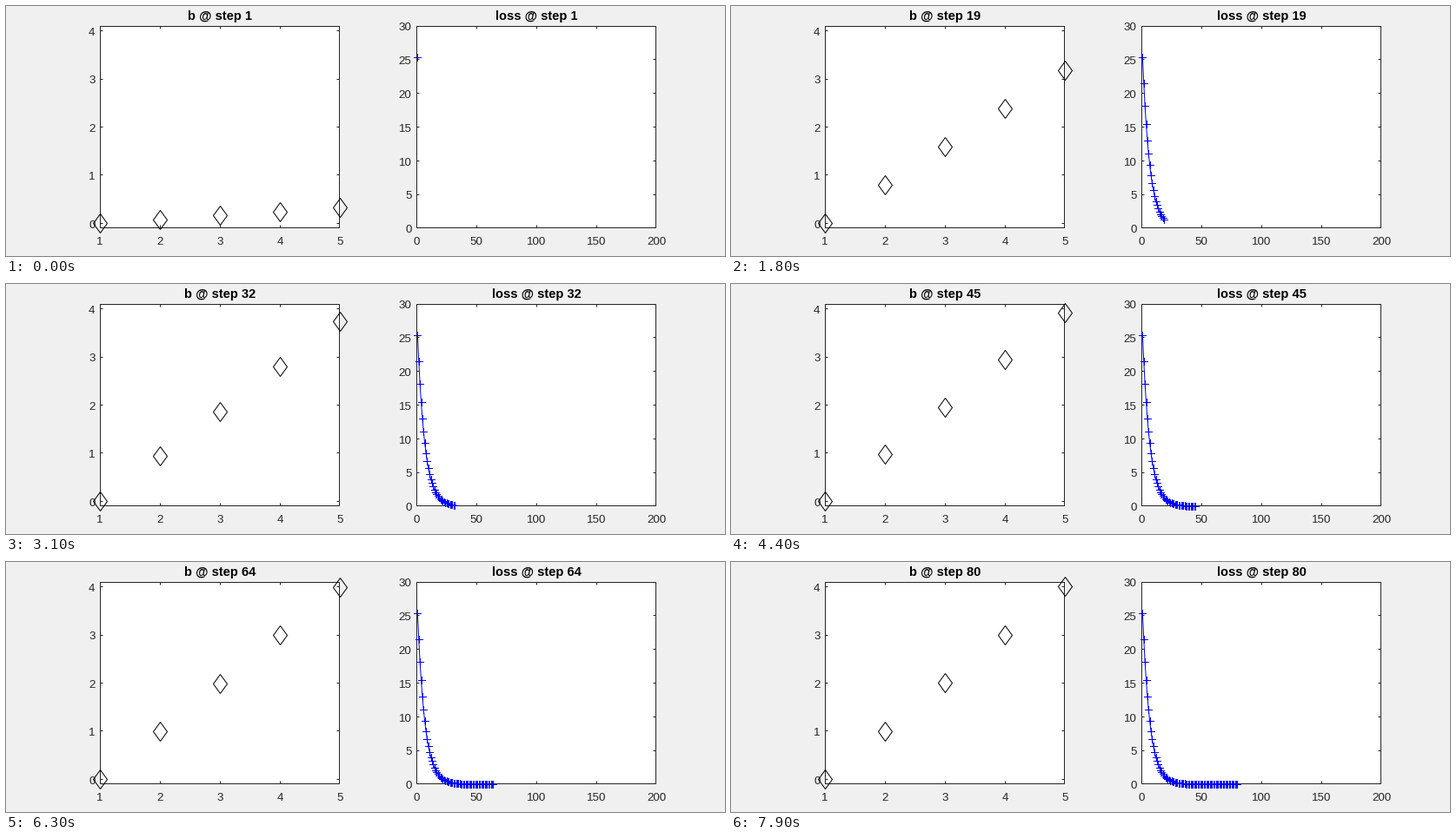
A matplotlib script for the animation above (8000 ms loop, 827 px wide and 288 px high).

```python
import numpy as np
import matplotlib.pyplot as plt
from matplotlib.animation import FuncAnimation
from matplotlib.collections import LineCollection, PolyCollection
from matplotlib.markers import MarkerStyle
from matplotlib.patches import Rectangle

W, H, DPI = 827, 288, 64
PX = 72 / DPI  # points per pixel
STEPS = 80
RATE = 0.08
INK = "#262626"
TOP, BOTTOM, WIDTH = 23, 256, 276

plt.rcParams["font.family"] = "Liberation Sans"
fig = plt.figure(figsize=(W / DPI, H / DPI), dpi=DPI, facecolor="#f0f0f0")
ax = fig.add_axes([0, 0, 1, 1])
ax.set_xlim(0, W)
ax.set_ylim(H, 0)
ax.axis("off")


def label(x, y, text, ha="center", size=13.33, color=INK, weight="normal"):
    return ax.text(x, y, text, ha=ha, va="baseline", fontsize=size * PX,
                   color=color, weight=weight)


class Panel:
    def __init__(self, left, xlim, ylim, xticks, yticks):
        self.left, self.xlim, self.ylim = left, xlim, ylim
        self.title = label(left + WIDTH / 2, 16, "", size=14.67,
                           color="black", weight="bold")
        self.draw_frame(xticks, yticks)

    def px(self, x):
        lo, hi = self.xlim
        return self.left + (np.asarray(x) - lo) / (hi - lo) * WIDTH

    def py(self, y):
        lo, hi = self.ylim
        return BOTTOM - (np.asarray(y) - lo) / (hi - lo) * (BOTTOM - TOP)

    def draw_frame(self, xticks, yticks):
        x0, x1 = self.left + 0.5, self.left + WIDTH - 0.5
        y0, y1 = TOP + 0.5, BOTTOM - 0.5
        ax.add_patch(Rectangle((self.left, TOP), WIDTH, BOTTOM - TOP,
                               fc="white", ec="none", zorder=0))
        lines = [[(x0, y0), (x1, y0), (x1, y1), (x0, y1), (x0, y0), (x1, y0)]]
        for t in xticks:
            x = self.px(t)
            label(x, 275, str(t))
            x = min(np.floor(x) + 0.5, x1)
            lines += [[(x, y0), (x, y0 + 3)], [(x, y1), (x, y1 - 3)]]
        for t in yticks:
            y = self.py(t)
            label(self.left - 5.5, y + 5.3, str(t), ha="right")
            y = min(np.floor(y) + 0.5, y1)
            lines += [[(x0, y), (x0 + 3, y)], [(x1, y), (x1 - 3, y)]]
        box = LineCollection(lines, colors=INK, linewidths=PX, zorder=1)
        box.set_snap(False)
        ax.add_collection(box)


weights = Panel(108, (1, 5), (-0.1, 4.1), range(1, 6), range(5))
losses = Panel(472, (0, 200), (0, 30), range(0, 201, 50), range(0, 31, 5))

goal = np.arange(5)
diamond = np.array([(-8, 0), (0, -11), (8, 0), (0, 11)])
diamonds = PolyCollection([diamond], facecolors="none", edgecolors="black",
                          linewidths=PX, joinstyle="miter", zorder=4)
diamonds.set_snap(False)
ax.add_collection(diamonds, autolim=False)

curve, = ax.plot([], [], color="blue", lw=PX, ms=8 * PX, mew=PX, zorder=4,
                 marker=MarkerStyle("+", capstyle="projecting"))


def update(frame):
    step = frame + 1
    weights.title.set_text(f"b @ step {step}")
    losses.title.set_text(f"loss @ step {step}")

    # Gradient descent shrinks the error by a fixed factor each step.
    b = goal * (1 - (1 - RATE) ** step)
    centers = np.column_stack([weights.px(goal + 1), weights.py(b)])
    diamonds.set_verts([diamond + np.floor(c) + 0.5 for c in centers])

    n = np.arange(1, step + 1)
    loss = np.sum(goal ** 2) * (1 - RATE) ** (2 * n)
    curve.set_data(losses.px(n), losses.py(loss))
    return weights.title, losses.title, diamonds, curve


anim = FuncAnimation(fig, update, frames=STEPS, interval=100, repeat=True,
                     repeat_delay=0, blit=False)
plt.show()
```
